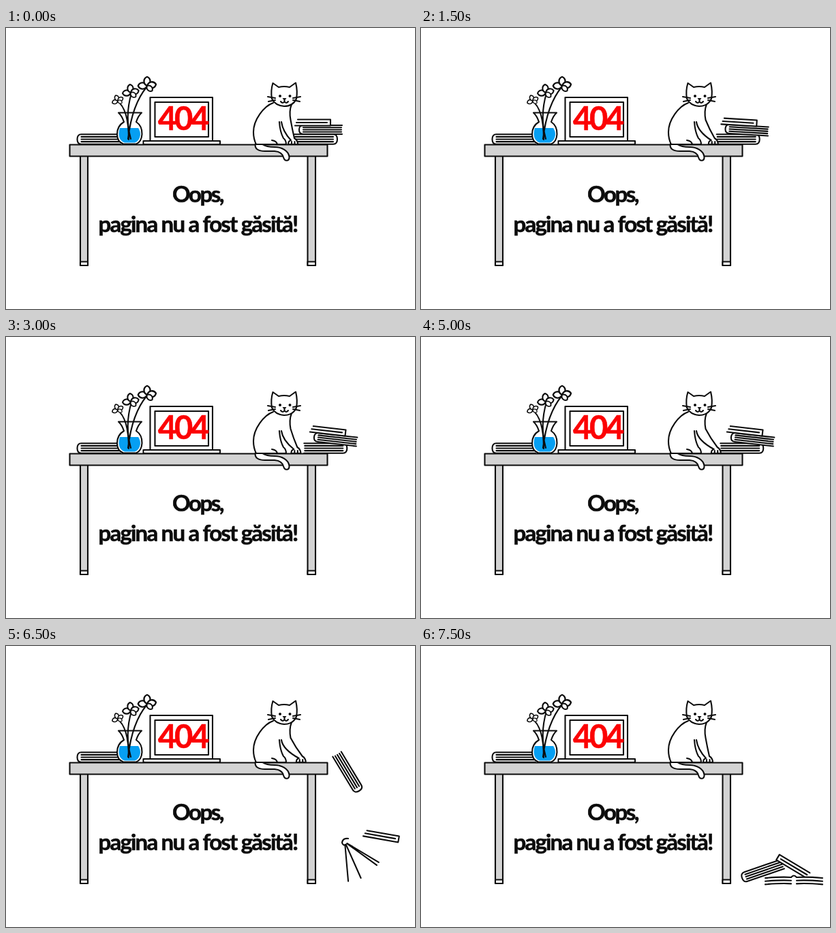
Recreate the animation shown at these times as an HTML page. Size 600 by 413 pixels, loop 8 s.

```html
<!DOCTYPE html>
<html lang="ro">
<head>
<meta charset="utf-8">
<title>404</title>
<style>
html, body { margin: 0; width: 100%; height: 100%; overflow: hidden; background: #fff; }
svg { display: block; width: 100%; height: 100%; }
.ink { fill: none; stroke: #0c0c0c; stroke-width: 2.1; stroke-linecap: round; stroke-linejoin: round; }
.paper { fill: #fff; }
.desk { fill: #d3d3d3; }
.dot { fill: #0c0c0c; stroke: none; }
text { font: 700 33px Lato, "Open Sans", sans-serif; text-anchor: middle; fill: #0c0c0c; stroke: #0c0c0c; stroke-width: .6; }
.red { font-size: 47px; letter-spacing: -3.2px; fill: #fc0204; stroke: #fc0204; }
</style>
</head>
<body>
<svg viewBox="0 0 600 413">
  <defs>
    <path id="petal" class="paper" d="M0 0C-6-3-5-10 0-12C5-10 6-3 0 0Z"/>
    <g id="flower">
      <use href="#petal" transform="rotate(-100)"/>
      <use href="#petal" transform="rotate(-10)"/>
      <use href="#petal" transform="rotate(70)"/>
      <use href="#petal" transform="rotate(125)scale(.8)"/>
    </g>
  </defs>

  <g class="ink">
    <g class="desk">
      <path d="M109 189V349H120V189M442.5 189V349H454V189"/>
      <path d="M93.5 171.5H471.5V188.5H93.5Z"/>
    </g>
    <path class="paper" d="M109 343.5H120V349H109ZM442.5 343.5H454V349H442.5Z"/>

    <g id="left" transform="translate(104.5 163.5)"></g>

    <path class="paper" d="M165 124.5H199Q194 129 191 138Q200 144 199.5 156Q199 167 191 170.5H172Q163 167 163 156Q163 144 173 138Q170 129 165 124.5Z"/>
    <path fill="#069ff2" stroke="none" d="M167 147H194Q197 151 197 157Q196 166 189 168.5H174Q166 166 165.5 156Q165.500 151 167 147Z"/>
    <path d="M180 164Q180 119 163 107M183 163Q174 130 184 96M179 163Q185 112 207 86"/>
    <use href="#flower" transform="translate(164 107)rotate(-10)scale(.72)"/>
    <use href="#flower" transform="translate(183 95)rotate(5)"/>
    <use href="#flower" transform="translate(207 85)rotate(10)scale(1.1)"/>

    <path class="paper" d="M211.500 102H303V166H211.500ZM218.500 109H297V160H218.500ZM201.500 166H314V171H201.500Z"/>

    <g id="low"></g>
    <g id="mid"></g>
    <g id="fan"></g>
    <g id="flat"></g>
    <g id="top"></g>

    <path fill="#fff" stroke="none" d="M391 109C378 115 363 135 363 153Q363 171 374 171H410L419 111Z"/>
    <path class="paper" d="M366 170C364 178 371 181 380 181H394Q405 182 407 190C409 197 416 196 415.500 189C414 180 404 175 394 175Q382 175 376 171"/>
    <path d="M392 110C378 115 363 135 363 153Q363 163 367 171H398"/>
    <path class="paper" d="M401 138Q402 153 407 162Q411 165 411 171H398Q397 166 390 165"/>
    <path id="arm" class="paper"/>
    <path class="paper" d="M390 104Q388 92 391.500 81L400 87Q408 85 416 87L425 80.500Q428 93 426 104Q421 115 408 115Q395 114 390 104Z"/>
    <path d="M384 101L395 103M385 108L395 106M421 103L432 101M421 106L431 108M408.500 106V108Q406 112 403 108M408.500 108Q411 112 414 108"/>
    <g class="dot">
      <circle cx="402" cy="100" r="2"/>
      <circle cx="416.500" cy="100" r="2"/>
      <path d="M405.500 103H411.500L408.500 107Z"/>
    </g>
  </g>

  <text x="259" y="149.500" class="red">404</text>
  <text x="281" y="255.500" style="letter-spacing:-2.500px">Oops,</text>
  <text x="281.500" y="300" style="letter-spacing:-1.800px">pagina nu a fost găsită!</text>
</svg>
<script>
const el = id => document.getElementById(id);
const clamp = v => Math.max(0, Math.min(1, v));
const LOOP = 8000, BEAT = 500;
const SLIDE = 22, NUDGE = 3, TILT = 6.5, SWING = 45;

const shape = (id, d) => el(id).innerHTML = `<path class="paper" d="${d}"/>`;

// Closed book: starts at the middle of its spine and runs to the right.
function closed(len, h) {
  const r = h / 2;
  let d = `M${len} ${-r}H6Q0 ${-r} 0 0T6 ${r}H${len}`;
  for (let i = -1; i <= 1; i++) d += `M6 ${i * h / 4}H${len - 1}`;
  return d;
}

// Book falling open: pages spread out from the spine.
function fanned() {
  let d = 'M5-5Q-3-6-4 1Q-3 5 1 5';
  for (const deg of [85, 66, 36, 31]) {
    const a = deg * Math.PI / 180;
    d += `M${4 * Math.cos(a)} ${4 * Math.sin(a)}L${58 * Math.cos(a)} ${58 * Math.sin(a)}`;
  }
  return d;
}

// Book lying open: stacked pages on both sides of the spine.
function spread() {
  let d = 'M-4 0Q0-5 4 0';
  for (const side of [-1, 1])
    for (let y = 0; y < 11; y += 4.7) d += `M${side * 4} ${y}Q${side * 18} ${y - 1} ${side * 42} ${y + 1}`;
  return d;
}

for (const id of ['left', 'low', 'mid']) shape(id, closed(63, id === 'mid' ? 13 : 14.4));
shape('top', 'M52-4.5H0V4.5H48M50 0H5');
shape('fan', fanned());
shape('flat', spread());

// x, y and angle of each book in mid-air and on the floor
const air = { top: [576, 284, 190], mid: [497, 288, 0], low: [518, 213, 239] };
const floor = { top: [523.5, 310.5, 31], mid: [547, 340, 0], low: [471, 341, -19] };

// Where the books stand on the desk once pushed s pixels.
function onDesk(s) {
  const tilt = TILT * clamp((s - 10) / 12);
  return {
    top: [476 + s, 139 + tilt * .3, 180 + tilt],
    mid: [430 + s, 149.5 - tilt * .4, tilt],
    low: [486 + s * .65, 163.5, 180]
  };
}

function fly(from, to, p) {
  const [x, y, a] = from.map((v, i) => v + (to[i] - v) * p);
  return [x + SWING * 4 * p * (1 - p), y, a];
}

const place = (id, [x, y, a]) =>
  el(id).setAttribute('transform', `translate(${x} ${y})rotate(${a})`);

function reach(p) {
  el('arm').setAttribute('d', `M419 112Q415 122 417.5 135Q${420 + (p - 428) * .4} 149 ${p - 5} 162
    Q${p} 165 ${p} 171H${p - 14}Q${p - 14} 166 ${p - 10} 165Q406 152 404 138
    M${p - 9} 171V167M${p - 4.5} 171V167`);
}

function draw(now) {
  const t = Math.floor(now % LOOP / BEAT) * BEAT;
  const push = SLIDE * clamp(t / 2000) + (t >= 5000 ? NUDGE : 0);
  const fall = clamp((t - 5500) / 1000);
  const landed = t >= 7000;
  const resting = t >= 3000 && t < 5000;

  const desk = onDesk(push);
  const look = landed ? 'flat' : fall ? 'fan' : 'mid';
  for (const id of ['mid', 'fan', 'flat']) el(id).style.display = id === look ? '' : 'none';
  for (const id in desk)
    place(id === 'mid' ? look : id, landed ? floor[id] : fly(desk[id], air[id], fall));
  reach(t >= 7500 ? 428 : 428 + push * .47 - (resting ? 6 : 0));
  requestAnimationFrame(draw);
}
requestAnimationFrame(draw);
</script>
</body>
</html>
```
